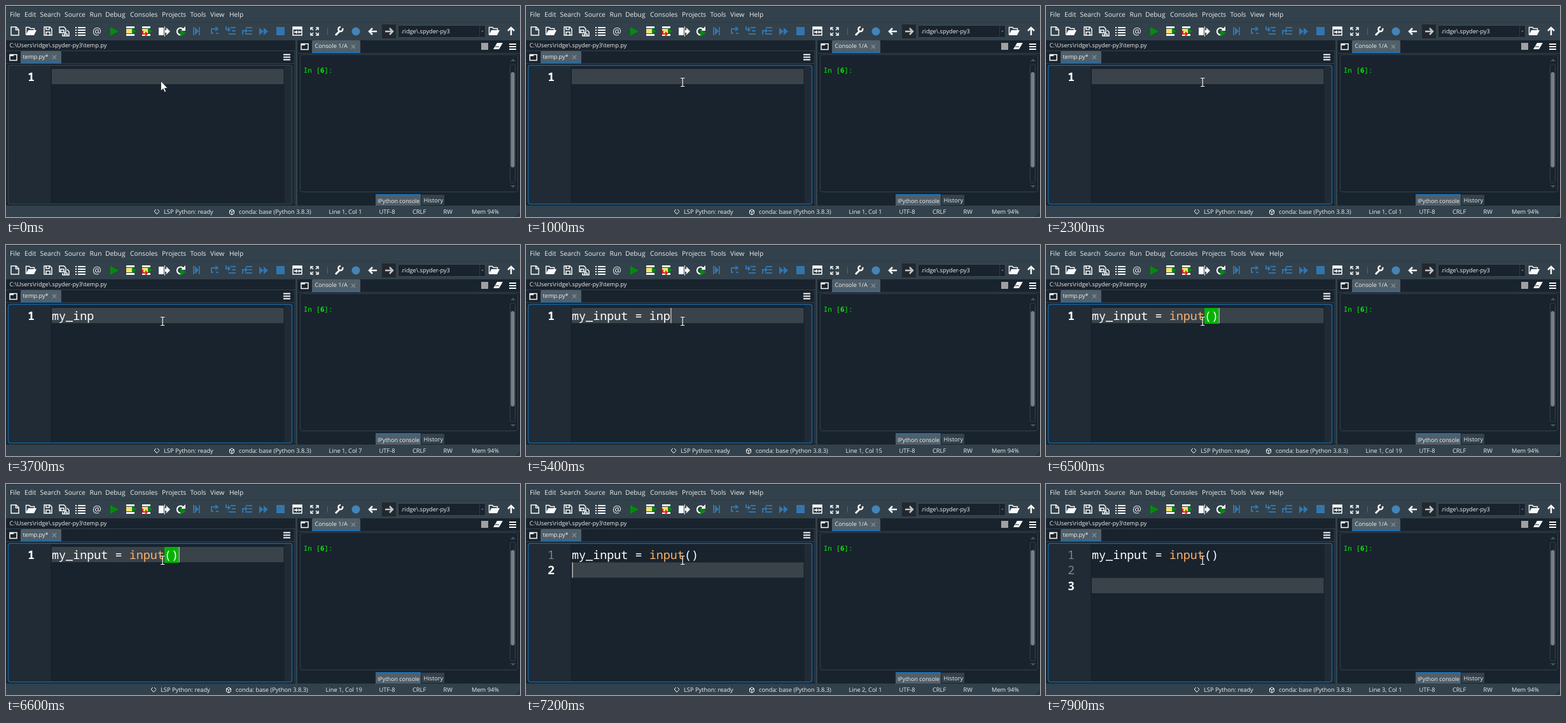
An HTML page that plays this animation: 808 by 332 pixels, repeating every 8000 ms.

```html
<!DOCTYPE html>
<html lang="en">
<head>
<meta charset="utf-8">
<title>Typing in a code editor</title>
<style>
  html, body { margin: 0; width: 100%; height: 100%; overflow: hidden; background: #19232d; }
  svg { display: block; width: 808px; height: 332px; }
  text { fill: #f0f0f0; font: 9.2px "Open Sans", "Noto Sans", sans-serif; text-rendering: geometricPrecision; white-space: pre; }
  .menu text { font-size: 10.3px; }
  .status text { font-size: 9.3px; }
  .code text { fill: #fff; font: 18.43px "Noto Sans Mono", monospace; }
  .code .number { fill: #80868b; }
  .code .current { fill: #fff; font-weight: 700; }
  .prompt { fill: #00f500; font: 10.9px "Noto Sans Mono", monospace; }
  .bar { fill: #32414b; }
  .dark { fill: #19232d; }
  .tab { fill: #505f69; }
  .accent { fill: #1f6fae; }
  .frame { fill: none; stroke: #32414b; }
  .line { fill: none; stroke: #fafafa; stroke-width: 1.5; }
  .bold { stroke-width: 2; }
  .thin { stroke-width: 1; }
  .solid { fill: #fafafa; }
  .green { fill: #008c0a; }
  .blue { fill: #3275ad; }
  .blueline { fill: none; stroke: #3275ad; stroke-width: 2; }
  .close { fill: none; stroke: #87939b; stroke-width: 1.1; }
  #caret { fill: #fff; mix-blend-mode: difference; }
</style>
</head>
<body>
<svg viewBox="0 0 808 332">
  <defs>
    <g id="folder"><path class="line" d="M1.5 14V2.500h5l2 2h6V7"/><path class="solid" d="M1 15l4-8h13l-4 8z"/></g>
    <path id="arrow" d="M14 0H3M7-5 2 0l5 5"/>
    <path id="burger" d="M0 0h11M0 4h11M0 8h11"/>
    <path id="cross" d="m-3-3 6 6m0-6-6 6"/>
    <g id="pane"><path class="line" d="M1 1.5h11v9H1z"/><path class="solid" d="M1 1h6v3H1z"/></g>
    <g id="cell">
      <path class="solid" d="M0 0h13v3H0zM0 12h13v3H0z"/>
      <path fill="#f4e36b" d="M0 4h9v7H0z"/>
      <path class="green" d="M9 3l7 4.500L9 12z"/>
    </g>
    <clipPath id="folderBox"><path d="M622 30h121v20H622z"/></clipPath>
  </defs>

  <path class="dark" d="M0 0h808v332H0z"/>
  <path class="bar" d="M0 0h808v54H0zM0 314h808v18H0zM455 54h3v260h-3z"/>
  <path d="M0 .5h808" stroke="#222d36"/>
  <path d="M0 25.5h808" stroke="#2d3a44"/>

  <g class="menu" id="menu"></g>

  <!-- toolbar -->
  <path class="line" d="M8 33h8l4 4v9H8zM15.5 33v4.500H20"/>
  <use href="#folder" x="30" y="31"/>
  <path class="line" d="M60 33h9l3 3v10H60zM63 46v-5h6v5M63 33v4h5v-4"/>
  <path class="line" d="M84 33h7l3 3v6H84zM86 42v-4h5v4M96 38l3 3v6H89v-3M92 47v-3h4v3"/>
  <path class="line bold" d="M109 34h2m2 0h12M109 38h2m2 0h12M109 42h2m2 0h12M109 46h2m2 0h12"/>
  <text x="136" y="45" style="font-size: 15.5px">@</text>
  <path class="green" d="M164 33l13 7-13 7z"/>
  <use href="#cell" x="189" y="32"/>
  <use href="#cell" x="214" y="32"/>
  <path d="M215 39v5h6M219 41l3 3-3 3" fill="none" stroke="#e02020" stroke-width="2"/>
  <path class="solid" d="M240 34h8v12h-8zM249 38h3v-4l6 6-6 6v-4h-3z"/>
  <path d="M249.5 32v16" stroke="#fafafa"/>
  <path d="M279 37a5.500 5.500 0 1 0 0 6" fill="none" stroke="#fafafa" stroke-width="2.2"/>
  <path class="solid" d="M282 32v7h-7z"/>
  <path class="green" d="M274 37l9 5.500-9 5.500z"/>
  <path class="blue" d="M294 33h2v13h-2zM297 33l6 6.500-6 6.500zM303 33h1.800v13H303z"/>
  <path class="blueline" d="M331 36h-8v7h3M329 33l4 3-4 3M330 43h4"/>
  <path class="blueline" d="M346 32v5h5M349 34l3 3-3 3M353 34h8M355 39h6M350 44h11"/>
  <path class="blueline" d="M372 45v-6h6M376 36l3 3-3 3M377 34h10M381 39h6M376 44h11"/>
  <path class="blue" d="M398 34l7 6-7 6zM405 34l7 6-7 6zM425 33h13v13h-13z"/>
  <path class="line" d="M451 33h14v13h-14z"/>
  <path class="solid" d="M451 33h14v4h-14zM453 40h3v-2l3 3-3 3v-2h-3zM464 40h-3v-2l-2 3 2 3v-2h3z"/>
  <path class="line" d="M479 38v-4h4M487 34h4v4M491 42v4h-4M483 46h-4v-4M480 35l3 3M490 35l-3 3M490 45l-3-3M480 45l3-3"/>
  <path d="M505.5 35v10" stroke="#586873"/>
  <path d="M518 46l7-7" stroke="#fafafa" stroke-width="3"/>
  <path d="M529 35a3.500 3.500 0 1 1-3-2" fill="none" stroke="#fafafa" stroke-width="2.5"/>
  <circle cx="550" cy="40" r="6.5" fill="#4584b6"/>
  <g fill="none" stroke-width="2.5">
    <use href="#arrow" stroke="#fafafa" x="569" y="40"/>
    <path d="M591 29h22v22h-22z" fill="#22282e"/>
    <use href="#arrow" stroke="#c4c8cb" transform="translate(610 40) scale(-1 1)"/>
    <use href="#arrow" stroke="#fafafa" transform="translate(794 32) rotate(90)"/>
  </g>
  <rect x="616.5" y="30.5" width="137" height="19" rx="2" class="dark" stroke="#3b4b56"/>
  <path d="M744.5 31v18" stroke="#2d3a44"/>
  <path d="M747 39h4l-2 2z" fill="#6c7a84"/>
  <g clip-path="url(#folderBox)"><text x="619.5" y="43">\ridge\.spyder-py3</text></g>
  <use href="#folder" x="758" y="31"/>

  <!-- editor pane -->
  <text x="5.5" y="65.4">C:\Users\ridge\.spyder-py3\temp.py</text>
  <path class="frame" d="M0 70.5h455M0 90.5h453M453.5 71v241"/>
  <path class="tab" d="M23 89V73q0-2 2-2h60q2 0 2 2v16z"/>
  <path class="accent" d="M23 88.5h64v2H23z"/>
  <use href="#pane" x="5" y="75"/>
  <text x="26.5" y="82.6">temp.py*</text>
  <use href="#cross" class="close" x="76" y="80.5"/>
  <use href="#burger" class="line bold" x="436" y="76.5"/>
  <path d="M5 95h65v215H5zM438 95h11v215h-11z" fill="#212b35"/>
  <rect id="border" x="3.5" y="93.5" width="446" height="218" rx="3" class="frame" stroke-width="1.5"/>
  <g class="code">
    <rect id="highlight" x="72" y="99" width="364.5" height="24" fill="#3a424a"/>
    <rect id="brackets" x="249" y="99" width="23" height="25" fill="#00b400"/>
    <g id="numbers"></g>
    <text id="target" x="72" y="118"></text>
    <text id="call" x="193.66" y="118"></text>
    <text id="parens" x="248.96" y="118"></text>
    <rect id="caret" y="99" width="1.4" height="24"/>
  </g>

  <!-- console pane -->
  <path class="frame" d="M459 74.5h349"/>
  <path class="tab" d="M481 73V56q0-2 2-2h72q2 0 2 2v17z"/>
  <path class="accent" d="M481 72h76v2h-76z"/>
  <use href="#pane" x="463" y="58"/>
  <text x="485.5" y="65.6">Console 1/A</text>
  <use href="#cross" class="close" x="546" y="64"/>
  <path d="M747 58h11v11h-11z" fill="#a0a0a0"/>
  <path class="solid" d="M772 58h9l-6 10h-9z"/>
  <path d="M769 64h6" stroke="#19232d"/>
  <use href="#burger" class="line bold" x="791" y="60"/>
  <rect x="462.5" y="76.5" width="342" height="216" rx="3" class="frame"/>
  <text class="prompt" x="467.8" y="105">In [<tspan font-weight="700">6</tspan>]:</text>
  <rect x="792.5" y="91.5" width="8" height="187" rx="3" class="frame"/>
  <rect x="793.5" y="104" width="6" height="150" rx="3" fill="#787f85"/>
  <path d="M793 87l4-4 4 4zM793 282l4 4 4-4z" fill="#46545e"/>
  <path class="tab" d="M581 296h71v18h-71z"/>
  <path class="accent" d="M581 296h71v2h-71z"/>
  <path class="bar" d="M653 297h36v16h-36z"/>
  <text x="584" y="309.5" style="font-size: 8.95px">IPython console</text>
  <text x="656.5" y="308.5">History</text>

  <!-- status bar -->
  <g class="status">
    <g id="shifting">
      <path class="line thin" d="M236 320l-3 3 3 3M238 320l3 3M235 325l2 2.500 4-4"/>
      <text x="248" y="327.2">LSP Python: ready</text>
      <path class="line thin" d="M355 320l3.500 2v4.500L355 328.500l-3.500-2V322zM351.5 322l3.500 2 3.500-2M355 324v4.500"/>
      <text x="366" y="327.2">conda: base (Python 3.8.3)</text>
      <text id="position" x="507.5" y="327.2"></text>
    </g>
    <text x="586.5" y="327.2">UTF-8</text>
    <text x="639" y="327.2">CRLF</text>
    <text x="687.5" y="327.2">RW</text>
    <text x="732" y="327.2">Mem 94%</text>
    <path d="M801 332l7-7M804 332l4-4" stroke="#19232d"/>
  </g>

  <path id="pointer" d="M243.5 118v15.500l3.500-3.300 2.300 5.300 2.300-1-2.300-5.200h4.700z" fill="#fff" stroke="#10161c" stroke-width=".7"/>
  <path id="beam" d="M243 113.5h2.500l.7.700.7-.7h2.500M243 126.5h2.500l.7-.7.7.7h2.500M246.2 114v12" fill="none" stroke="#f4f4f4" stroke-width="1.2"/>
</svg>
<script>
const LOOP = 8000, STEP = 100;
const LINE_HEIGHT = 24.4, CHAR_WIDTH = 11.06, CODE_LEFT = 72;
const BEAM_AT = 200, FOCUS_AT = 450, BLINK = 530;
const ASSIGNMENT = 'my_input = ', CALL = 'input';

// One time per keystroke; the last two are line breaks.
const KEYS = [3100, 3200, 3300, 3400, 3500, 3600, 4000, 4100, 4300, 4600, 4700,
  5200, 5300, 5400, 5600, 5600, 6300, 6500, 7100, 7500];
const NAME_END = ASSIGNMENT.length + CALL.length;

const el = id => document.getElementById(id);
const show = (id, on) => el(id).setAttribute('visibility', on ? 'visible' : 'hidden');

function addText(parent, x, y, content) {
  const node = document.createElementNS('http://www.w3.org/2000/svg', 'text');
  node.setAttribute('x', x);
  node.setAttribute('y', y);
  node.textContent = content;
  return parent.appendChild(node);
}

Object.entries({
  File: 6, Edit: 29, Search: 53.5, Source: 92, Run: 131.5, Debug: 156, Consoles: 195,
  Projects: 245, Tools: 289.5, View: 321, Help: 351
}).forEach(([label, x]) => addText(el('menu'), x, 17, label));

const numbers = [1, 2, 3].map(n => addText(el('numbers'), 34, 118 + (n - 1) * LINE_HEIGHT, n));

function caretVisible(t, typed) {
  if (t < FOCUS_AT) return false;
  const ticks = time => Math.floor((time - FOCUS_AT) / BLINK);
  const lastInput = typed ? KEYS[typed - 1] : FOCUS_AT;
  return (ticks(t) - ticks(lastInput)) % 2 === 0;
}

function render(t) {
  const typed = KEYS.filter(time => time <= t).length;
  const line = 1 + Math.max(0, typed - NAME_END - 2);
  const col = line > 1 ? 1 : typed + 1;
  const top = 99 + (line - 1) * LINE_HEIGHT;

  el('target').textContent = ASSIGNMENT.slice(0, typed);
  el('call').textContent = CALL.slice(0, Math.max(0, typed - ASSIGNMENT.length));
  el('call').style.fill = typed >= NAME_END ? '#fab16c' : '#fff';
  el('parens').textContent = typed > NAME_END ? '()' : '';
  show('brackets', typed > NAME_END && line === 1);

  numbers.forEach((node, i) => {
    node.setAttribute('class', i + 1 === line ? 'current' : 'number');
    node.setAttribute('visibility', i < line ? 'visible' : 'hidden');
  });

  el('highlight').setAttribute('y', top);
  el('caret').setAttribute('y', top);
  el('caret').setAttribute('x', CODE_LEFT + 0.4 + (col - 1) * CHAR_WIDTH);
  show('caret', caretVisible(t, typed));

  el('position').textContent = `Line ${line}, Col ${col}`;
  el('shifting').setAttribute('transform', `translate(${col > 9 ? -5 : 0} 0)`);
  el('border').style.stroke = t >= FOCUS_AT ? '#1a649c' : '#32414b';
  show('pointer', t < BEAM_AT);
  show('beam', t >= BEAM_AT);
}

const start = performance.now();
function frame() {
  const t = (performance.now() - start) % LOOP;
  render(Math.floor(t / STEP) * STEP);
  requestAnimationFrame(frame);
}
frame();
</script>
</body>
</html>
```
